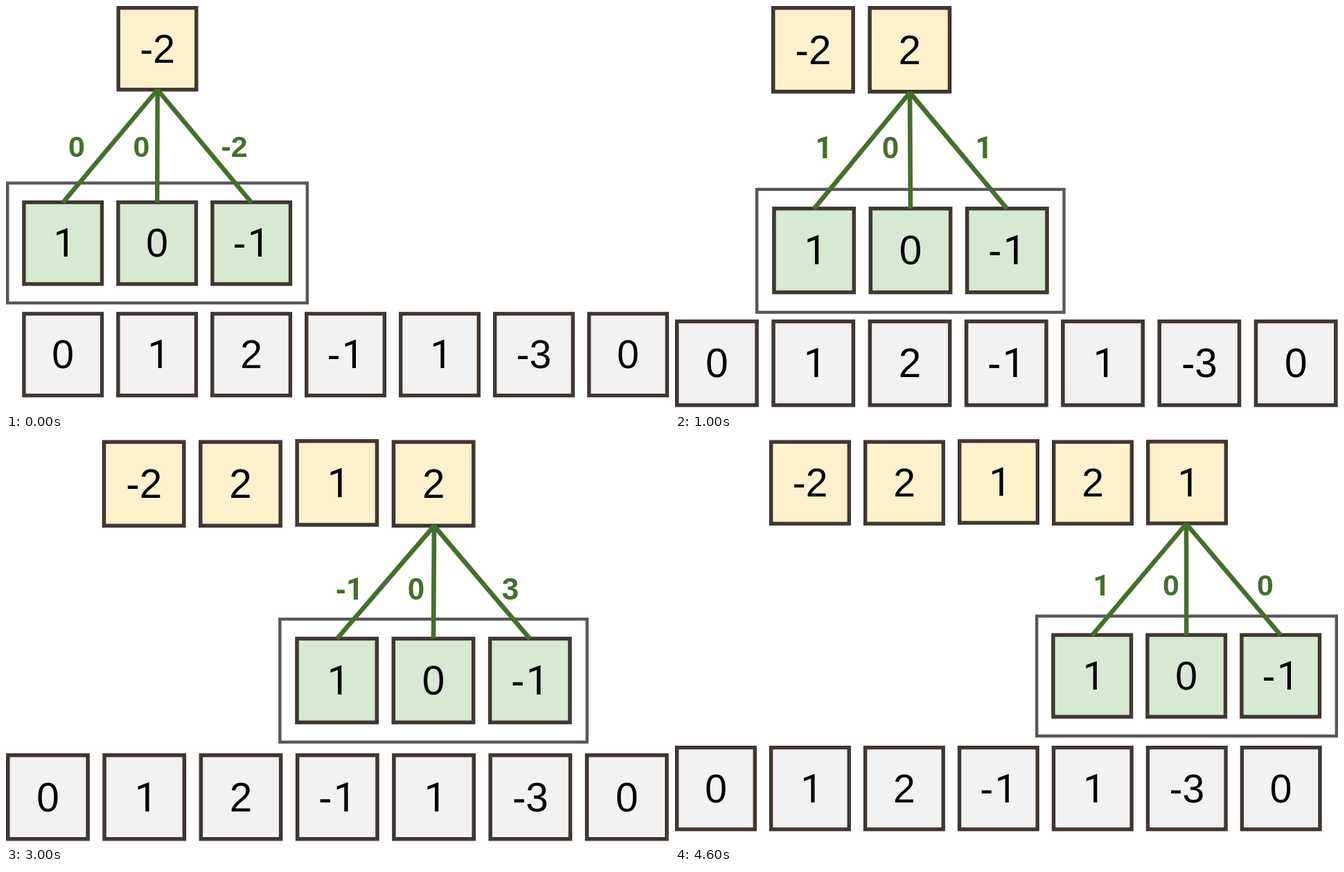
Recreate the animation shown at these times as an HTML page. Size 957x585 px, loop 5 s.

```html
<!DOCTYPE html>
<html lang="en">
<head>
<meta charset="utf-8">
<title>Sliding kernel</title>
<style>
  html, body { margin: 0; width: 100%; height: 100%; overflow: hidden; background: #fff; }
  svg { display: block; width: 100%; height: 100%; }
  text { font-family: "Liberation Sans", Arial, sans-serif; text-anchor: middle; }
  .one { font-family: Roboto, "Liberation Sans", sans-serif; }
  .product { font-weight: bold; fill: #43702b; }
  .cell { stroke: #403732; }
  .input { fill: #f2f2f2; }
  .kernel { fill: #d7e9d1; }
  .output { fill: #fff1cb; }
  .window { fill: none; stroke: #58585a; }
  .link { stroke: #43702b; }
  .step { visibility: hidden; animation: show 5s step-end infinite; }
  @keyframes show {
    0% { visibility: visible; }
    20%, 100% { visibility: hidden; }
  }
</style>
</head>
<body>
<svg id="stage" viewBox="0 0 957 585"></svg>
<script>
const INPUT = [0, 1, 2, -1, 1, -3, 0];
const KERNEL = [1, 0, -1];
const BOX = { w: 118, h: 123.5, pitch: 136 };

// scale: zoom of the step; inX, inY: input row; kerX, kerY: kernel row;
// outX, outY: left edge of the outputs and the top of each;
// win: window corner; labels: centres of the products, labelY: their height
const STEPS = [
  { scale: 1, inX: 23.2, inY: 441.8, kerX: 23.2, kerY: 280.8, outX: 159.5, outY: [0],
    win: [0, 253.5], apex: [218.7, 121], labels: [102, 195.5, 329.5], labelY: 203 },
  { scale: 1.0245, inX: 0, inY: 452.8, kerX: 140.2, kerY: 289.8, outX: 139, outY: [0, 0],
    win: [116, 262.7], apex: [339, 125], labels: [215, 311, 446], labelY: 205 },
  { scale: 1.0245, inX: 0, inY: 454, kerX: 279.1, kerY: 291.2, outX: 138.7, outY: [1.5, 1.5, 0.2],
    win: [254.8, 264.2], apex: [478.5, 123], labels: [361, 456, 600], labelY: 216.5 },
  { scale: 1.0245, inX: 0, inY: 454, kerX: 417.2, kerY: 285.6, outX: 138.7, outY: [1.5, 1.5, 0.2, 1.5],
    win: [393.2, 258], apex: [618, 125.5], labels: [496, 592, 728], labelY: 217 },
  { scale: 1, inX: 0, inY: 443, kerX: 543.2, kerY: 280.4, outX: 136, outY: [1.5, 1.5, 0.3, 1.5, 1.1],
    win: [520, 253.6], apex: [738, 122.5], labels: [615.5, 716, 852], labelY: 211.5 }
];

const SVG = "http://www.w3.org/2000/svg";

function add(parent, tag, attrs) {
  const node = document.createElementNS(SVG, tag);
  for (const key in attrs) node.setAttribute(key, attrs[key]);
  return parent.appendChild(node);
}

// Text centred on a point; the digit 1 uses a face without a foot.
function label(parent, value, x, y, size, cls, nudge = 0) {
  const text = add(parent, "text", { x, y: y + size * 0.347, "font-size": size, class: cls });
  for (const ch of String(value)) {
    const attrs = ch === "1" ? { class: "one", dx: nudge * size } : {};
    add(text, "tspan", attrs).textContent = ch;
  }
}

function frame(parent, x, y, w, h, line, cls) {
  add(parent, "rect", {
    x: x + line / 2, y: y + line / 2, width: w - line, height: h - line,
    "stroke-width": line, class: cls
  });
}

function cell(parent, value, x, y, scale, cls) {
  const w = BOX.w * scale, h = BOX.h * scale;
  frame(parent, x, y, w, h, 5.4 * scale, "cell " + cls);
  label(parent, value, x + w / 2, y + h / 2, 57 * scale, "", 0.04);
}

const products = at => KERNEL.map((k, i) => k * INPUT[at + i] || 0);
const outputs = INPUT.slice(2).map((_, i) => products(i).reduce((a, b) => a + b));

STEPS.forEach((s, n) => {
  const group = add(stage, "g", { class: "step" });
  group.style.animationDelay = (n ? n - STEPS.length : 0) + "s";
  const pitch = BOX.pitch * s.scale;

  INPUT.forEach((v, i) => cell(group, v, s.inX + i * (pitch - 0.05), s.inY, s.scale, "input"));
  s.outY.forEach((y, i) => cell(group, outputs[i], s.outX + i * pitch, y, s.scale, "output"));
  frame(group, ...s.win, 437 * s.scale, 177.6 * s.scale, 4.4, "window");
  KERNEL.forEach((v, i) => cell(group, v, s.kerX + i * pitch, s.kerY, s.scale, "kernel"));

  products(n).forEach((v, i) => {
    add(group, "line", {
      x1: s.apex[0], y1: s.apex[1],
      x2: s.kerX + i * pitch + BOX.w * s.scale / 2, y2: s.kerY + 3,
      "stroke-width": 6.5 * s.scale, class: "link"
    });
    label(group, v, s.labels[i], s.labelY, 43 * s.scale, "product");
  });
});
</script>
</body>
</html>
```
